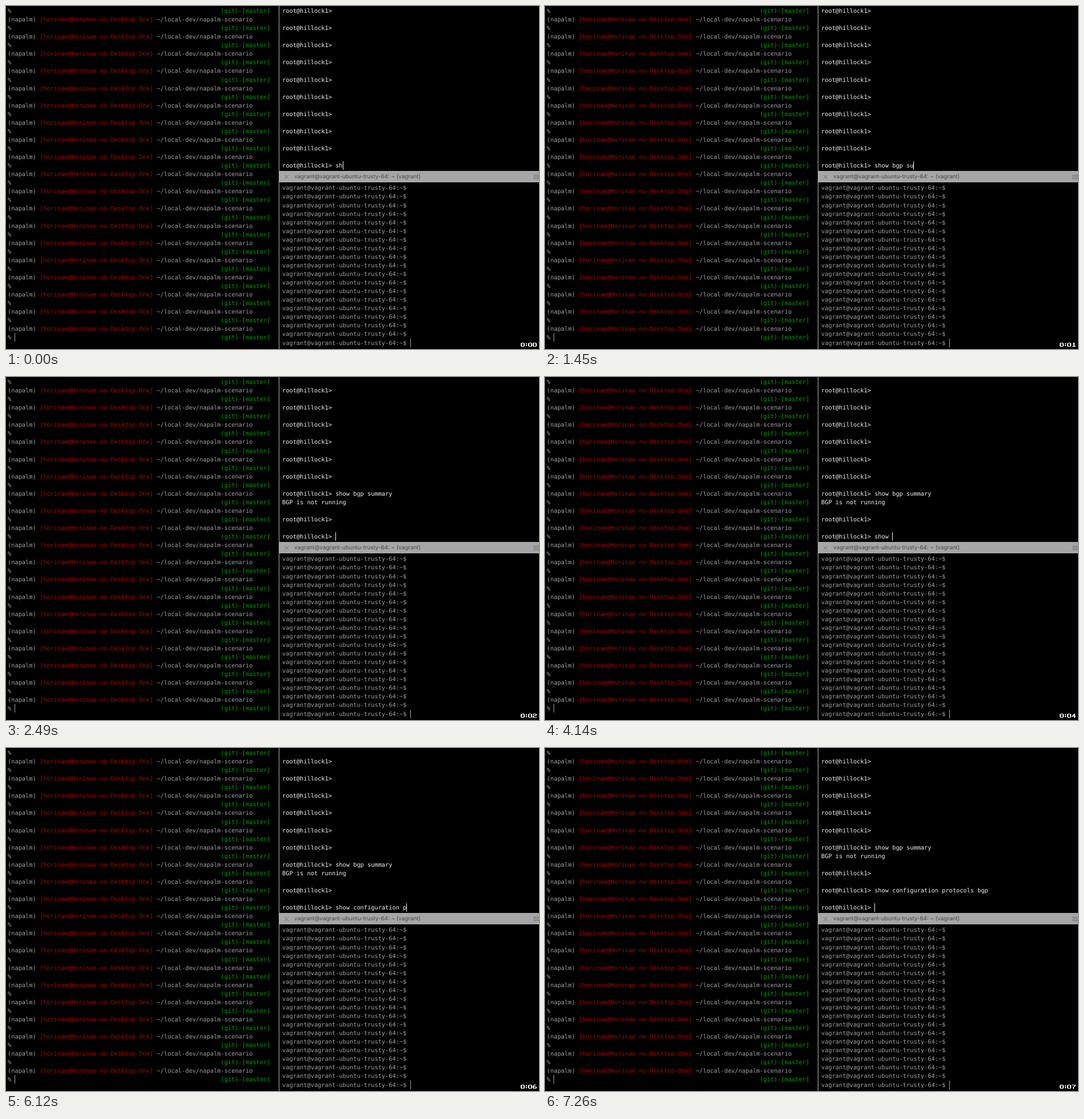
Animation of 932x601 px, one loop 8000 ms. Source, as an HTML page:

```html
<!DOCTYPE html>
<html lang="en">
<head>
<meta charset="utf-8">
<title>Terminal session</title>
<style>
html, body { margin: 0; width: 100%; height: 100%; overflow: hidden; background: #000; }
pre, .bar, svg, .rule { position: absolute; margin: 0; }
pre {
  font: 10.32px/15.07px "DejaVu Sans Mono", monospace;
  text-rendering: geometricPrecision;
  font-variant-ligatures: none;
  color: #a2a2a2;
}
pre i {
  display: inline-block; vertical-align: top;
  width: 1px; height: 15px; margin: -1px -1px 0 0; background: currentColor;
}
#left { left: 3px; top: 2px; }
#left b { font-weight: 400; color: #b00600; }
#left u { text-decoration: none; color: #00a400; }
#top { left: 483px; top: 2px; color: #f2f2f2; }
#bottom { left: 483px; top: 312.4px; }
.rule { left: 477px; top: 0; width: 1px; height: 601px; background: #b4b4b4; }
.bar {
  left: 478px; top: 289px; width: 454px; height: 20px; background: #a6a6a6;
  font: 9.8px/22px Inter, sans-serif; text-rendering: geometricPrecision; color: #484848;
}
.bar span { position: absolute; left: 26px; white-space: pre; }
svg { left: 0; top: 0; }
</style>
</head>
<body>
<pre id="left"></pre>
<pre id="top"></pre>
<pre id="bottom"></pre>
<div class="rule"></div>
<div class="bar"><span>vagrant@vagrant-ubuntu-trusty-64: ~ (vagrant)</span></div>
<svg width="932" height="601" fill="none">
  <path d="M487 296l7 7m0-7l-7 7" stroke="#666"/>
  <path d="M922 296.5h10m-10 3h10m-10 3h10" stroke="#666"/>
  <g id="clock" stroke="#fff" stroke-linecap="square" shape-rendering="crispEdges"></g>
</svg>
<script>
const $ = id => document.getElementById(id);
const LOOP = 8000, ROWS = 19;
const cursor = '<i></i>';
const prompt = 'root@hillock1&gt;';

// pen strokes of the clock digits on a 7 by 7 grid
const digits = [
  'M1 0h3M0 1v4M5 1v4M1 6h3',
  'M3 0v6M2 1h1M1 6h4',
  'M0 1h0M1 0h3M5 1v1M1 3h3M0 4v2h5',
  'M0 1h0M1 0h3M5 1v1M2 3h2M5 4v1M1 6h3M0 5h0',
  'M4 0v6M3 1L0 4h5',
  'M5 0h-5v2h4M5 3v2M1 6h3M0 5h0',
  'M2 0h2M1 1h0M0 2v3M0 3h4M5 4v1M1 6h3',
  'M0 0h5v1l-3 3v2'
];
const colon = 'M0 1v1M0 4v1';

const ticks = [1060, 2100, 3050, 4040, 5120, 6120, 7180];

// [time, text on the input line]
const typing = [
  [0, 'sh'], [260, 'show'], [440, 'show '],
  [610, 'show b'], [700, 'show bg'], [790, 'show bgp'], [960, 'show bgp '],
  [1330, 'show bgp s'], [1450, 'show bgp su'], [1710, ''],
  [3500, 's'], [3590, 'sh'], [3860, 'sho'], [3950, 'show'], [4140, 'show '],
  [4770, 'show c'], [4860, 'show co'], [5030, 'show con'], [5220, 'show conf'],
  [5400, 'show configuration'], [5490, 'show configuration '],
  [6120, 'show configuration p'], [6210, 'show configuration pro'],
  [6290, 'show configuration protocols'], [6380, 'show configuration protocols '],
  [6740, 'show configuration protocols bg'], [6910, 'show configuration protocols bgp'],
  [7260, '']
];

// [time, lines added above the input line]
const output = [
  [1710, prompt + ' show bgp summary', 'BGP is not running', ''],
  [2490, prompt, ''],
  [7260, prompt + ' show configuration protocols bgp', '']
];

function session(t) {
  const lines = Array(9).fill([prompt, '']).flat();
  for (const [at, ...added] of output) if (t >= at) lines.push(...added);
  const typed = typing.filter(([at]) => at <= t).pop()[1];
  lines.push(prompt + ' ' + typed + cursor);
  return lines.slice(-ROWS).join('\n');
}

function glyph(x, d) {
  const stroke = dx => `<path transform="translate(${x + dx + .5} 590.5)" d="${d}"/>`;
  return stroke(0) + stroke(1);
}

function clock(t) {
  const sec = ticks.filter(at => at <= t).length;
  return glyph(900, digits[0]) + glyph(909, colon) + glyph(913, digits[0]) + glyph(921, digits[sec]);
}

function update(el, html) {
  if (el.shown !== html) el.innerHTML = el.shown = html;
}

const branch = ' '.repeat(58) + '<u>(git)-[master]</u>';
const path = '(napalm) <b>[horinae@Horinae-no-Desktop-One]</b> ~/local-dev/napalm-scenario';
$('left').innerHTML = `% ${branch}\n${path}\n`.repeat(19) + '% ' + cursor + branch;
$('bottom').innerHTML = Array(ROWS).fill('vagrant@vagrant-ubuntu-trusty-64:~$ ').join('\n') + cursor;

function draw() {
  const t = performance.now() % LOOP;
  update($('top'), session(t));
  update($('clock'), clock(t));
  requestAnimationFrame(draw);
}
draw();
</script>
</body>
</html>
```
